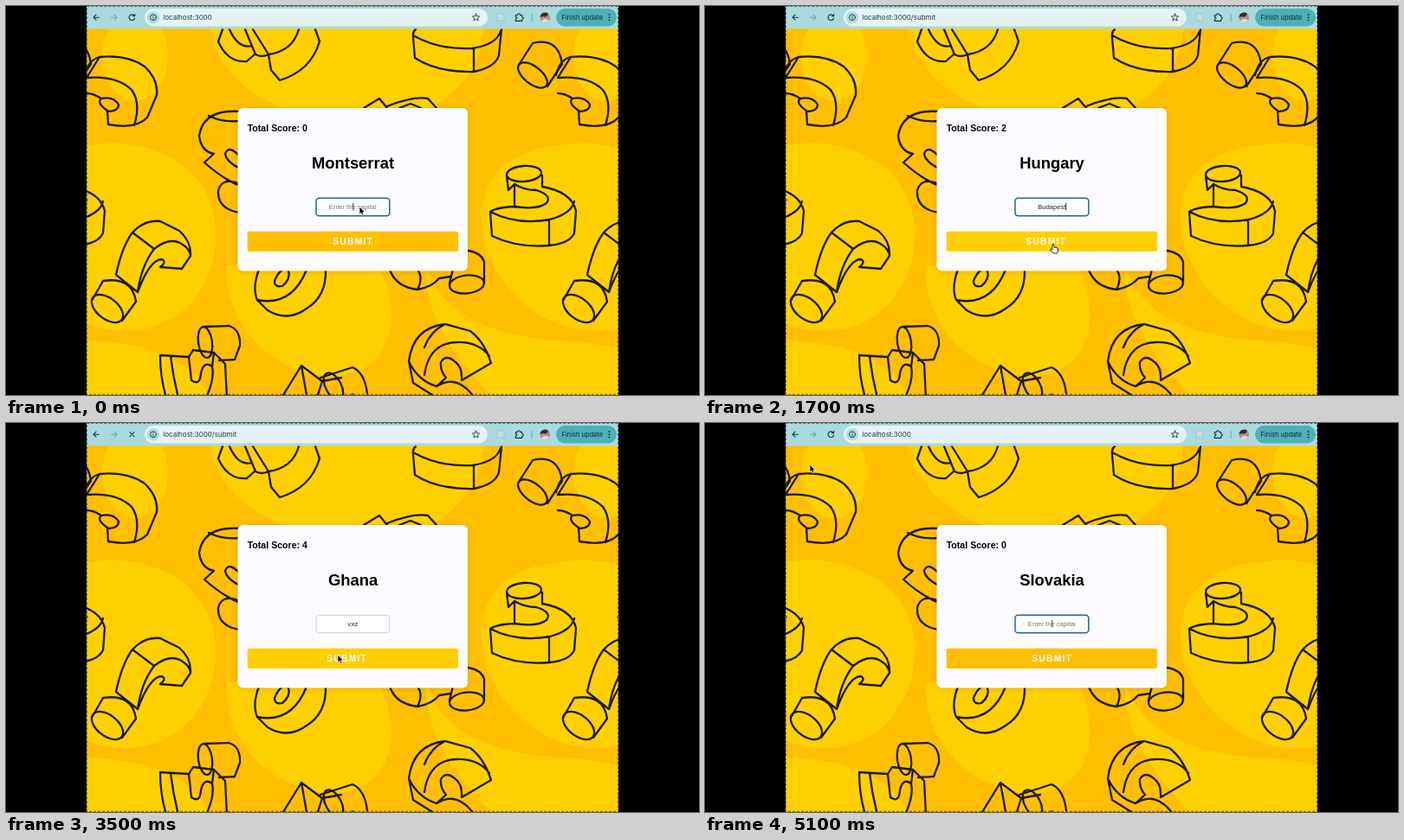
An HTML page that plays this animation: 800 px wide and 450 px high, repeating every 5200 ms.

```html
<!DOCTYPE html>
<html lang="en">
<head>
<meta charset="utf-8">
<title>Capital quiz</title>
<style>
html, body { margin: 0; width: 100%; height: 100%; overflow: hidden; background: #000; }
svg { display: block; }
.ui { font-family: Inter, sans-serif; }
.page { font-family: "Liberation Sans", Arial, sans-serif; }
.bold { font-weight: 700; }
.icon { fill: none; stroke: #17383b; stroke-width: 1.1; stroke-linecap: round; stroke-linejoin: round; }
.ink { fill: none; stroke: #1c1a16; stroke-width: 2.3; stroke-linecap: round; stroke-linejoin: round; }
.soft { filter: drop-shadow(0 1px 3px rgba(0, 0, 0, .13)); }
</style>
</head>
<body>
<svg width="100%" height="100%" viewBox="0 0 800 450">
  <rect width="800" height="450"/>
  <rect x="93" width="614" height="450" fill="#fdfbff"/>

  <g id="page" class="page">
    <svg x="93" y="26" width="614" height="424" viewBox="93 26 614 424">
      <rect x="93" y="26" width="614" height="424" fill="#ffbf00"/>
      <g id="blobs" fill="#ffd000">
        <path d="M640 161C705 150 780 180 786 255C790 325 745 372 690 376C610 380 548 310 549 245C550 190 590 165 640 161Z"/>
        <path d="M235 26C245 80 290 110 340 125H480C530 95 548 70 552 26Z"/>
        <path d="M255 300C250 385 335 442 400 425C450 408 455 350 430 300Z"/>
        <path d="M485 300C500 355 560 383 640 387C715 390 760 412 778 450H560C530 420 480 360 485 300Z"/>
        <ellipse cx="149" cy="58" rx="38" ry="52"/>
      </g>
      <use href="#blobs" x="-544"/>
      <use href="#blobs" x="544"/>
      <g id="shapes" class="ink">
        <path d="M250 27L245 41Q256 66 278 64L287 56M258 27Q268 50 284 46M276 27L288 56Q295 60 303 56L285 27M303 56Q331 52 338 27M303 56L306 74L316 86Q352 75 362 41L357 27"/>
        <path d="M473 27Q469 30 470 36L472 60Q498 77 540 76Q565 71 569 57L572 27M470 34Q500 51 538 49Q566 45 571 29M540 49V76"/>
        <path d="M592 68L608 43Q638 36 642 67L625 93"/>
        <ellipse cx="608" cy="80" rx="20" ry="10" transform="rotate(38 608 80)"/>
        <path d="M93 83L108 59Q140 56 160 70Q176 85 174 103L163 129Q150 143 118 137L117 121Q104 112 110 107Q124 104 130 114Q130 122 117 122M93 83Q128 80 145 97Q156 112 148 138M93 101Q101 101 110 107M108 59Q95 62 91 80"/>
        <path d="M270 122Q228 119 223 150Q225 168 240 171L229 181Q250 200 272 209M234 127Q250 135 270 133M270 188Q254 180 253 171Q257 160 270 174M245 214Q244 235 270 239M245 214Q249 197 270 206"/>
        <path d="M413 118L431 107L440 118M440 116Q470 104 487 107L497 118M454 118L467 113L479 118"/>
        <ellipse cx="598" cy="194" rx="20" ry="9" transform="rotate(-4 598 194)"/>
        <path d="M578 196L580 213L587 206V232Q566 233 559 238L561 266Q590 280 627 277Q650 275 656 263L658 237Q653 215 619 209V196M559 238Q590 254 628 247Q653 240 656 226M627 247V277M587 206Q598 213 612 213Q631 219 624 228Q614 236 587 232"/>
        <path d="M127 311Q134 278 146 262Q160 247 178 249L200 260Q214 272 213 289L203 304L178 302Q186 296 180 293Q166 293 152 331ZM146 262L171 281Q190 266 204 276Q212 281 213 289M171 281Q156 301 152 331"/>
        <path d="M99 341L112 318Q146 313 150 342L134 364"/>
        <ellipse cx="117" cy="350" rx="21" ry="12" transform="rotate(38 117 350)"/>
        <path d="M292 305Q284 326 290 340L302 352Q325 366 347 350Q370 336 369 305M290 340Q330 348 347 305M310 318Q317 301 326 306Q329 316 319 324Q310 326 310 318"/>
        <path d="M443 305Q450 325 475 328Q492 325 500 315L513 313M475 328Q482 314 475 305M512 321L517 300Q522 284 534 283Q549 286 552 296V321"/>
        <ellipse cx="532" cy="322" rx="20" ry="10.5" transform="rotate(-6 532 322)"/>
        <ellipse cx="230" cy="389" rx="8" ry="18" transform="rotate(-8 230 389)"/>
        <path d="M228 371L257 370Q271 374 270 393L264 409L246 410M178 404L211 406L216 398L240 401L253 414L255 453M178 404Q178 430 185 453M190 405Q193 430 199 453M211 406L214 433Q224 440 225 425Q228 410 238 417Q241 432 231 453M240 401L238 417"/>
        <path d="M320 450L341 416L365 434L387 430M341 416L347 450M363 430L400 418Q414 424 417 448M365 434L360 450"/>
        <ellipse cx="378" cy="440" rx="9" ry="17" transform="rotate(-28 378 440)"/>
        <path d="M465 411Q470 372 507 368L536 376Q552 388 560 413L526 433Q527 418 519 412Q508 402 502 412Q501 422 508 430L497 440Q475 433 465 411M465 411L470 436L497 453M483 427Q488 390 520 389Q545 388 558 405M507 368Q490 376 483 395M497 440Q520 425 540 452"/>
      </g>
      <use href="#shapes" x="-544"/>
      <use href="#shapes" x="544"/>
    </svg>
    <rect class="soft" x="267.5" y="118" width="265.5" height="188.5" rx="6" fill="#fdfbff"/>
    <text id="score" class="bold" x="278.7" y="145" font-size="10.6"></text>
    <text id="country" class="bold" x="400.5" y="188" font-size="18.4" text-anchor="middle"></text>
    <rect id="field" x="358" y="222.3" width="84.8" height="20.5" rx="3.5" fill="#fff"/>
    <text id="answer" x="400.3" y="235" font-size="7.6" text-anchor="middle"></text>
    <path id="caret" d="M0 228V236.5" stroke="#111" stroke-width=".8"/>
    <rect id="button" x="278.7" y="260.7" width="243.3" height="23.3" rx="2.5"/>
    <text id="submit" class="bold" y="275.8" font-size="10.3" letter-spacing="1.25" fill="#fff">SUBMIT</text>
    <text id="tick" x="420" y="276" font-size="11" fill="#5c4e1c" style="font-family:'DejaVu Sans',sans-serif">✔</text>
  </g>

  <g class="ui">
    <rect x="93" width="614" height="26.4" fill="#a9dadd"/>
    <rect x="160" y="3" width="396" height="20.4" rx="10.2" fill="#e5f3f5"/>
    <circle cx="170" cy="13.2" r="7.3" fill="#b3dcdf"/>
    <g class="icon">
      <path d="M107.5 13.2H101M104 10.2L101 13.2L104 16.2"/>
      <path d="M121.5 13.2H128M125 10.2L128 13.2L125 16.2" stroke="#78a5a8"/>
      <path id="reload" d="M148 11.2A3.3 3.3 0 1 0 148.6 14M148.7 9.3V11.6H146.4"/>
      <path id="stop" d="M143 10.7L148 15.7M148 10.7L143 15.7"/>
      <circle cx="170" cy="13.2" r="3.5" stroke-width=".9"/>
      <path d="M170 13V15M170 11.4V11.5" stroke-width=".9"/>
      <path d="M542.5 9L543.7 11.8L546.6 12L544.4 14L545.1 16.9L542.5 15.3L539.9 16.9L540.6 14L538.4 12L541.3 11.8Z" stroke-width=".9"/>
      <path d="M588.3 10.5H590.5Q590.5 8.7 592 8.7T593.5 10.5H595.7V12.7Q597.3 12.8 597.3 14T595.7 15.4V17.4H588.3V15Q590 15 590 13.8T588.3 12.6Z"/>
    </g>
    <rect x="567" y="9" width="8" height="8" rx="1.5" fill="#c3dfe0" stroke="#91b9bb" stroke-width=".7"/>
    <path d="M607 9V18" stroke="#62a9ae"/>
    <circle cx="622.3" cy="13.4" r="5.8" fill="#ad8f83"/>
    <path d="M616.5 13A5.8 5.8 0 0 1 626 9Q624 14 620 12Z" fill="#352d2c"/>
    <path d="M618 17.4Q622 12.5 627 16.8A5.8 5.8 0 0 1 618 17.4Z" fill="#e1d9d5"/>
    <rect x="635" y="3" width="70" height="20.4" rx="10.2" fill="#4fb0b5"/>
    <text x="641.5" y="16" font-size="7.5" fill="#0b2c2f">Finish update</text>
    <g fill="#0b2c2f"><circle cx="696.5" cy="10" r=".9"/><circle cx="696.5" cy="13.2" r=".9"/><circle cx="696.5" cy="16.4" r=".9"/></g>
    <text id="url" x="181.3" y="16.1" font-size="8" fill="#25383a"></text>
    <g id="dialog">
      <rect class="soft" x="272" y="24.5" width="256" height="82.5" rx="7" fill="#141a1b"/>
      <text x="283.3" y="46.3" font-size="9.3" font-weight="500" fill="#eef3f3">localhost:3000 says</text>
      <text x="283.3" y="63" font-size="7.4" fill="#e5eaea">Game over! Final best score: 4</text>
      <rect x="480" y="75.3" width="36.6" height="20.3" rx="10.1" fill="#55b2b8"/>
      <text x="498.3" y="88.2" font-size="7.5" text-anchor="middle" fill="#0d4247">OK</text>
    </g>
  </g>

  <path d="M93.3 .4H706.7V449.4H93.3Z" fill="none" stroke="#333" stroke-width=".8" stroke-dasharray="3 2"/>
  <g fill="#555"><circle cx="93.5" cy="224.5" r="1.4"/><circle cx="706.5" cy="224.5" r="1.4"/><circle cx="400" cy="449.3" r="1.6"/><circle cx="400" cy="0" r="1.4" fill="#d0574e"/></g>

  <g id="pointer" stroke-linejoin="round">
    <path id="arrow" d="M0 0V9L2 7.2L3.4 10.2L5 9.5L3.7 6.7H6.3Z" stroke="#fff" stroke-width=".7"/>
    <path id="hand" d="M-1 1Q0 -1 1 1V4L4.6 4.8Q6 5.5 5.5 8.5L4.5 11H0L-3.5 7Q-3 5.3 -1 7Z" fill="#fff" stroke="#111" stroke-width=".9"/>
  </g>
</svg>
<script>
const LOOP = 5200, STEP = 100;
const ui = id => document.getElementById(id);
const show = (id, on) => ui(id).style.display = on ? "" : "none";
const set = (id, attrs) => { for (const k in attrs) ui(id).setAttribute(k, attrs[k]); };

const rounds = [
  { at: 0, country: "Montserrat", answer: "Plymouth", from: 0, to: 400, score: 0 },
  { at: 600, country: "American Samoa", answer: "Pago Pago", from: 700, to: 1100, score: 1 },
  { at: 1200, country: "Hungary", answer: "Budapest", from: 1300, to: 1700, score: 2 },
  { at: 1800, country: "Qatar", answer: "Doha", from: 1900, to: 2300, score: 3 },
  { at: 2400, country: "Ghana", answer: "vxz", from: 2800, to: 3200, score: 4 },
  { at: 4400, country: "Slovakia", answer: "", from: 5000, to: 5100, score: 0 }
];

// time, x, y
const path = [
  [0, 408, 232], [200, 408, 232], [500, 412, 269], [1100, 412, 269],
  [1500, 402, 275], [1700, 402, 275], [2200, 383, 279], [2900, 383, 279],
  [3300, 383, 268], [3600, 383, 268], [4000, 493, 87], [4200, 493, 87],
  [4900, 121, 48], [LOOP, 121, 48]
];

function pointerAt(t) {
  const i = path.findIndex(p => p[0] > t);
  const [t0, x0, y0] = path[i - 1], [t1, x1, y1] = path[i];
  const k = (t - t0) / (t1 - t0), e = k * k * (3 - 2 * k);
  return [x0 + (x1 - x0) * e, y0 + (y1 - y0) * e];
}

function draw(t) {
  const round = rounds.findLast(r => r.at <= t);
  const progress = Math.max(0, Math.min(1, (t - round.from) / (round.to - round.from)));
  const typed = round.answer.slice(0, Math.round(progress * round.answer.length));
  const home = t < 600 || t >= 4400;
  const loading = t >= 3400 && t < 4400;
  const hover = t >= 500 && t < 3600;
  const hand = hover && t < 3400;

  show("page", t < 3600 || t >= 4400);
  show("dialog", t >= 3700 && t < 4200);
  show("reload", !loading);
  show("stop", loading);
  show("arrow", !hand);
  show("hand", hand);
  show("tick", hover && t - round.at < 200);
  show("caret", !loading);

  ui("url").textContent = "localhost:3000" + (home ? "" : "/submit");
  ui("score").textContent = "Total Score: " + round.score;
  ui("country").textContent = round.country;
  ui("answer").textContent = typed || "Enter the capital";
  set("answer", { fill: typed ? "#222" : "#757575" });
  const end = typed ? ui("answer").getComputedTextLength() / 2 : 0;
  set("caret", { transform: `translate(${400.7 + end})` });
  set("field", loading ? { stroke: "#c5d0d6", "stroke-width": 1 } : { stroke: "#2460a8", "stroke-width": 1.5 });
  set("button", { fill: hover ? "#ffcf00" : "#ffbf00" });
  set("submit", { x: hover ? 370.2 : 377.2 });
  set("pointer", { transform: `translate(${pointerAt(t)})` });
}

function tick() {
  draw(Math.floor(performance.now() % LOOP / STEP) * STEP);
  requestAnimationFrame(tick);
}
tick();
</script>
</body>
</html>
```
